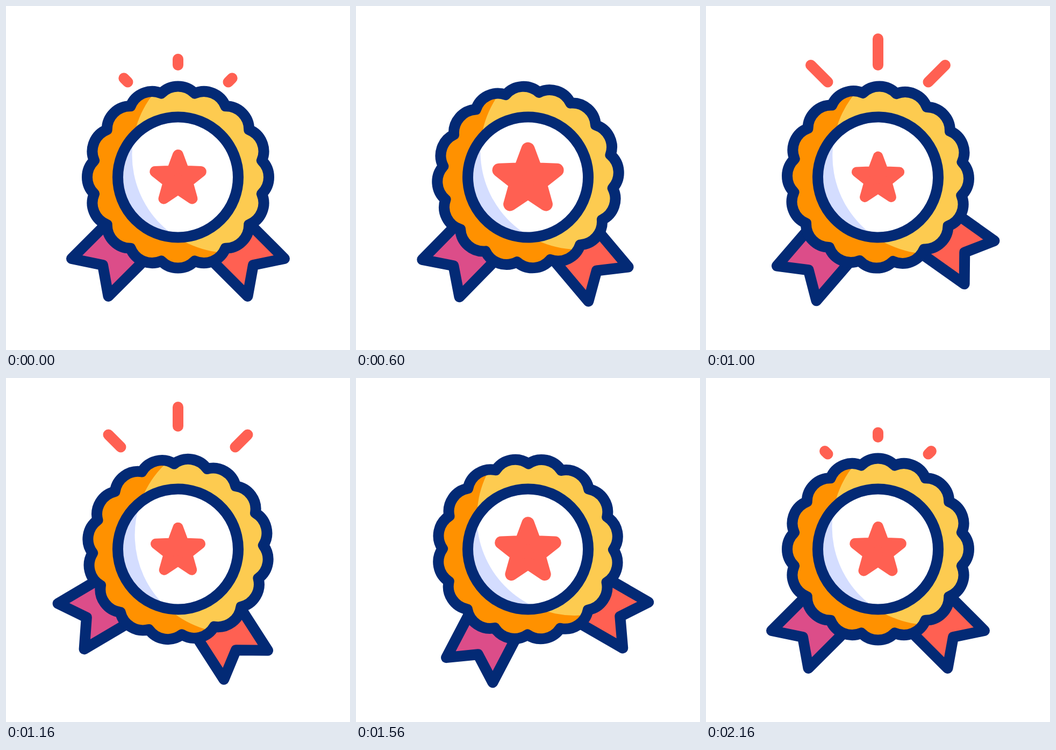
An HTML page for the animation above (2200 ms loop, 640 by 640 pixels).

```html
<!DOCTYPE html>
<html>
<head>
<meta charset="utf-8">
<style>
  html, body { margin: 0; height: 100%; overflow: hidden; background: #fff; }
  svg { display: block; width: 100%; height: 100%; }
  .line { stroke: #032a75; stroke-width: 20; stroke-linejoin: round; }
  .spark { stroke: #ff6052; stroke-width: 20; stroke-linecap: round; }
</style>
</head>
<body>
<svg viewBox="0 0 640 640">
  <defs>
    <clipPath id="lit"><circle cx="97" cy="-41.5" r="182.5"/></clipPath>
    <path id="ribbon" class="line" d="M-78 31.5L-198 151.5L-140 163.5L-129.5 221.5L-20 112Z"/>
  </defs>
  <g transform="translate(320 318.5)">
    <path class="spark"/>
    <path class="spark"/>
    <path class="spark"/>
    <g id="left"><use href="#ribbon" fill="#dc4d89"/></g>
    <g id="right"><use href="#ribbon" fill="#ff6052" transform="scale(-1 1)"/></g>
    <g id="badge">
      <path class="rim" fill="#ff9100"/>
      <path class="rim" fill="#fdcb50" clip-path="url(#lit)"/>
      <path class="rim line" fill="none"/>
      <circle r="112" fill="#d4ddff"/>
      <circle r="112" fill="#fff" clip-path="url(#lit)"/>
      <circle r="112" class="line" fill="none"/>
    </g>
    <path id="star" fill="#ff6052" stroke="#ff6052" stroke-width="20" stroke-linejoin="round"/>
  </g>
</svg>
<script>
const LOOP = 2200, STEP = 40;
const $ = id => document.getElementById(id);
const turn = (id, value) => $(id).setAttribute('transform', value);

const polar = (r, deg) => {
  const a = deg * Math.PI / 180;
  return (r * Math.sin(a)).toFixed(2) + ' ' + (-r * Math.cos(a)).toFixed(2);
};

// Rosette rim: 16 round scallops
let rim = 'M' + polar(159, -11.25);
for (let i = 0; i < 16; i++) rim += 'A43.3 43.3 0 0 1 ' + polar(159, 11.25 + i * 22.5);
document.querySelectorAll('.rim').forEach(p => p.setAttribute('d', rim + 'Z'));

const corners = Array.from({ length: 10 }, (_, i) => polar(i % 2 ? 18.8 : 45, i * 36));
$('star').setAttribute('d', 'M' + corners.join('L') + 'Z');

const ease = (t, from, to) => {
  const u = Math.min(1, Math.max(0, (t - from) / (to - from)));
  return (1 - Math.cos(Math.PI * u)) / 2;
};

// Sum of eased moves from one turning point [time, value] to the next
const glide = (t, keys) => keys.slice(1).reduce(
  (v, [time, value], i) => v + (value - keys[i][1]) * ease(t, keys[i][0], time), keys[0][1]);

const swing = t => glide(t, [[0, 0], [320, 24], [780, -22], [1150, 15], [1580, -19], [1950, 0]]);
const pulse = t => glide(t, [[240, 1], [600, 1.26], [1000, 0.93], [1640, 1.18], [2000, 1]]);

function drawSparks(t) {
  const edge = Math.min(t, LOOP - t);
  const resting = edge < 100;
  const head = resting ? 0.2 - 0.05 * edge / STEP : ease(t, 600, 1120);
  const tail = resting ? 0 : ease(t, 1000, 1390);
  document.querySelectorAll('.spark').forEach((spark, i) => {
    const side = i - 1;
    const at = p => side ? side * (93.5 + 36 * p) + ' ' + (-177 - 36 * p) : '0 ' + (-208.5 - 56 * p);
    spark.setAttribute('d', head - tail > 0.01 ? `M${at(tail)}L${at(head)}` : '');
  });
}

// The ribbons trail behind the badge, the right one most
function draw(now) {
  const t = Math.floor(now % LOOP / STEP) * STEP;
  turn('badge', `rotate(${0.58 * swing(t)})`);
  turn('left', `rotate(${swing(t - 40)} -11 26)`);
  turn('right', `rotate(${swing(t - 75)} 11 26)`);
  turn('star', `scale(${pulse(t)}) translate(0 3.5)`);
  drawSparks(t);
}

const start = performance.now();
function tick() {
  draw(performance.now() - start);
  requestAnimationFrame(tick);
}
tick();
</script>
</body>
</html>
```
